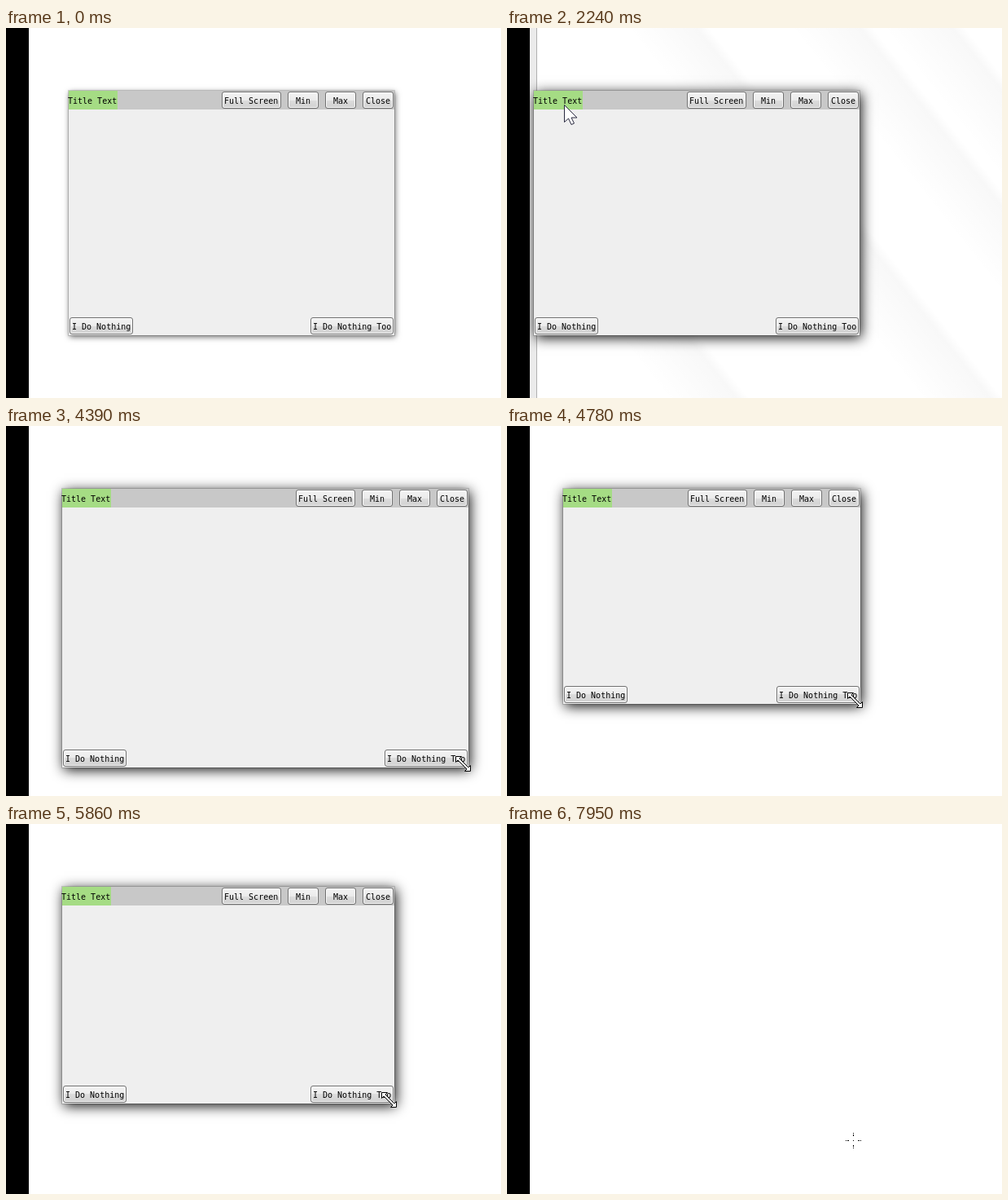
An HTML page with a canvas that plays this animation: 608x454 px, repeating every 8 s.

```html
<!DOCTYPE html>
<html lang="en">
<head>
<meta charset="utf-8">
<title>Frameless window</title>
<style>
html, body { margin: 0; width: 100%; height: 100%; overflow: hidden; background: #fff; }
canvas { display: block; }
</style>
</head>
<body>
<canvas id="stage" width="608" height="454"></canvas>
<script>
const ctx = document.getElementById('stage').getContext('2d');
const LOOP = 8000, TICK = 75;
const TOP = 77, WIDTH = 400, HEIGHT = 300, CHAR = 6, BUTTON_H = 21;
const GRAB = { x: 37, y: 17 };   // pointer inside the title while dragging
const GRIP = { x: 7, y: 5 };     // pointer inside the corner while resizing

// A straight move of the pointer, optionally bowed outwards half-way.
const glide = (from, to, x, y, bowX = 0, bowY = 0) => ({ from, to, x, y, bowX, bowY });
const moves = [
  glide(75, 375, 146, 90),
  glide(450, 525, 150, 116),
  glide(600, 1050, 114, 94),
  glide(1200, 1575, 28, 94),
  glide(1990, 2475, 106, 94),
  glide(2925, 3750, 462, 372),
  glide(4050, 4800, 375, 307, 141, 72),
  glide(5025, 5850, 470, 338, 90, 44),
  glide(5850, 6000, 454, 333),
  glide(6300, 6900, 337, 80),
  glide(7725, 7950, 425, 388)
];

const ramp = (t, a, b) => Math.min(1, Math.max(0, (t - a) / (b - a)));

function pointerAt(t) {
  let x = 453, y = 412;
  for (const m of moves) {
    const f = ramp(t, m.from, m.to), bow = Math.sin(Math.PI * f);
    x += (m.x - x) * f + m.bowX * bow;
    y += (m.y - y) * f + m.bowY * bow;
  }
  return { x: Math.round(x), y: Math.round(y) };
}

function frameAt(t) {
  const held = pointerAt(Math.min(t, 2475));
  const left = (t < 1200 ? 114 : held.x) - GRAB.x;
  if (t < 3750) return { left, right: left + WIDTH, bottom: TOP + HEIGHT };
  const grip = pointerAt(Math.min(t, 6000));
  return { left, right: grip.x + GRIP.x, bottom: grip.y + GRIP.y };
}

function label(text, x, y) {
  ctx.font = '10px "DejaVu Sans Mono", "Liberation Mono", monospace';
  ctx.fillStyle = '#000';
  ctx.fillText(text, x, y);
}

function outline(x, y, w, h, r, color) {
  ctx.beginPath();
  ctx.roundRect(x + 0.5, y + 0.5, w - 1, h - 1, r);
  ctx.strokeStyle = color;
  ctx.stroke();
}

function button(text, x, y, w, point) {
  const hot = point && point.x >= x && point.x < x + w && point.y >= y && point.y < y + BUTTON_H;
  const shades = hot ? ['#eaf6fd', '#d9f0fc', '#bee6fd', '#a7d9f5'] : ['#f4f4f4', '#ebebeb', '#dddddd', '#cfcfcf'];
  const g = ctx.createLinearGradient(0, y, 0, y + BUTTON_H);
  shades.forEach((c, i) => g.addColorStop(Math.ceil(i / 2) / 2, c));
  ctx.fillStyle = g;
  ctx.fillRect(x + 1, y + 1, w - 2, BUTTON_H - 2);
  outline(x + 1, y + 1, w - 2, BUTTON_H - 2, 1.5, 'rgba(255,255,255,.85)');
  outline(x, y, w, BUTTON_H, 2.5, hot ? '#3c7fb1' : '#707070');
  label(text, x + Math.floor((w - text.length * CHAR) / 2), y + 15);
}

function drawWindow({ left, right, bottom }, active, point) {
  const w = right - left, h = bottom - TOP;
  ctx.save();
  ctx.shadowColor = active ? 'rgba(0,0,0,.95)' : 'rgba(0,0,0,.6)';
  ctx.shadowBlur = active ? 15 : 7;
  ctx.shadowOffsetX = active ? 2 : 1;
  ctx.shadowOffsetY = active ? 3 : 2;
  ctx.fillStyle = '#efefef';
  ctx.fillRect(left, TOP, w, h);
  ctx.restore();
  outline(left - 1, TOP - 1, w + 2, h + 2, 0, 'rgba(0,0,0,.15)');

  ctx.fillStyle = '#c8c8c8';
  ctx.fillRect(left, TOP, w, 23);
  ctx.fillStyle = '#a5dc84';
  ctx.fillRect(left, TOP, 60, 23);
  label('Title Text', left - 1, 93);

  let x = right - 1;
  for (const text of ['Close', 'Max', 'Min', 'Full Screen']) {
    const bw = Math.max(38, text.length * CHAR + 7);
    button(text, x - bw, TOP + 1, bw, point);
    x -= bw + 8;
  }
  button('I Do Nothing', left + 1, bottom - 22, 78, point);
  button('I Do Nothing Too', right - 103, bottom - 22, 102, point);
}

// Snap preview: diagonal sheen plus a bevelled left edge.
function drawGlass(alpha) {
  ctx.save();
  ctx.globalAlpha = alpha;
  for (const edge of [-60, 185, 343, 432]) {
    const a = edge - 70, b = edge + 10;
    const g = ctx.createLinearGradient(0.78 * a, -0.62 * a, 0.78 * b, -0.62 * b);
    g.addColorStop(0, 'rgba(0,0,0,0)');
    g.addColorStop(0.85, 'rgba(0,0,0,.028)');
    g.addColorStop(1, 'rgba(0,0,0,0)');
    ctx.fillStyle = g;
    ctx.fillRect(28, 0, 580, 454);
  }
  ctx.fillStyle = '#ebebeb';
  ctx.fillRect(28, 0, 8, 454);
  ctx.fillStyle = '#b0b0b0';
  ctx.fillRect(36, 0, 1, 454);
  ctx.restore();
}

const ARROW = [[0, 0], [0, 21], [5, 16.5], [8.5, 24], [12, 22.5], [8.5, 15.5], [15.5, 15.5]];
const HALF = [[-9, -2], [-9, -9], [-2, -9], [-4.5, -6.5], [6.5, 4.5]];
const RESIZE = [...HALF, ...HALF.map(([x, y]) => [-x, -y])];

function drawShape(points, { x, y }, line) {
  ctx.beginPath();
  for (const [px, py] of points) ctx.lineTo(x + px + 0.5, y + py + 0.5);
  ctx.closePath();
  ctx.fillStyle = '#fff';
  ctx.fill();
  ctx.strokeStyle = line;
  ctx.stroke();
}

function drawCross({ x, y }) {
  ctx.fillStyle = '#000';
  for (const d of [-9, -7, -6, 0, 6, 7, 9]) {
    ctx.fillRect(x + d, y, 1, 1);
    ctx.fillRect(x, y + d, 1, 1);
  }
}

function draw(time) {
  const t = Math.floor((time + 12) / TICK) * TICK;
  const resizing = t >= 3675 && t <= 6300;
  const point = pointerAt(t), frame = frameAt(t);

  ctx.fillStyle = '#fff';
  ctx.fillRect(0, 0, 608, 454);
  const glass = ramp(t, 1425, 1575) - ramp(t, 2250, 2475);
  if (glass > 0) drawGlass(glass);

  const gone = ramp(t, 7200, 7575);
  if (gone < 1) {
    const scale = 1 - 0.35 * gone, mid = (frame.left + frame.right) / 2;
    ctx.save();
    ctx.globalAlpha = 1 - gone;
    ctx.translate(mid, TOP + 190 * gone);
    ctx.scale(scale, scale);
    ctx.translate(-mid, -TOP);
    drawWindow(frame, time >= 1210, t >= 75 && !resizing ? point : null);
    ctx.restore();
  }

  if (t >= 7875) drawCross(point);
  else if (resizing) drawShape(RESIZE, point, '#000');
  else if (t >= 75) drawShape(ARROW, point, '#2a2a40');

  ctx.fillStyle = '#000';
  ctx.fillRect(0, 0, 28, 454);
}

const start = performance.now();
function loop() {
  draw((performance.now() - start) % LOOP);
  requestAnimationFrame(loop);
}
loop();
</script>
</body>
</html>
```
